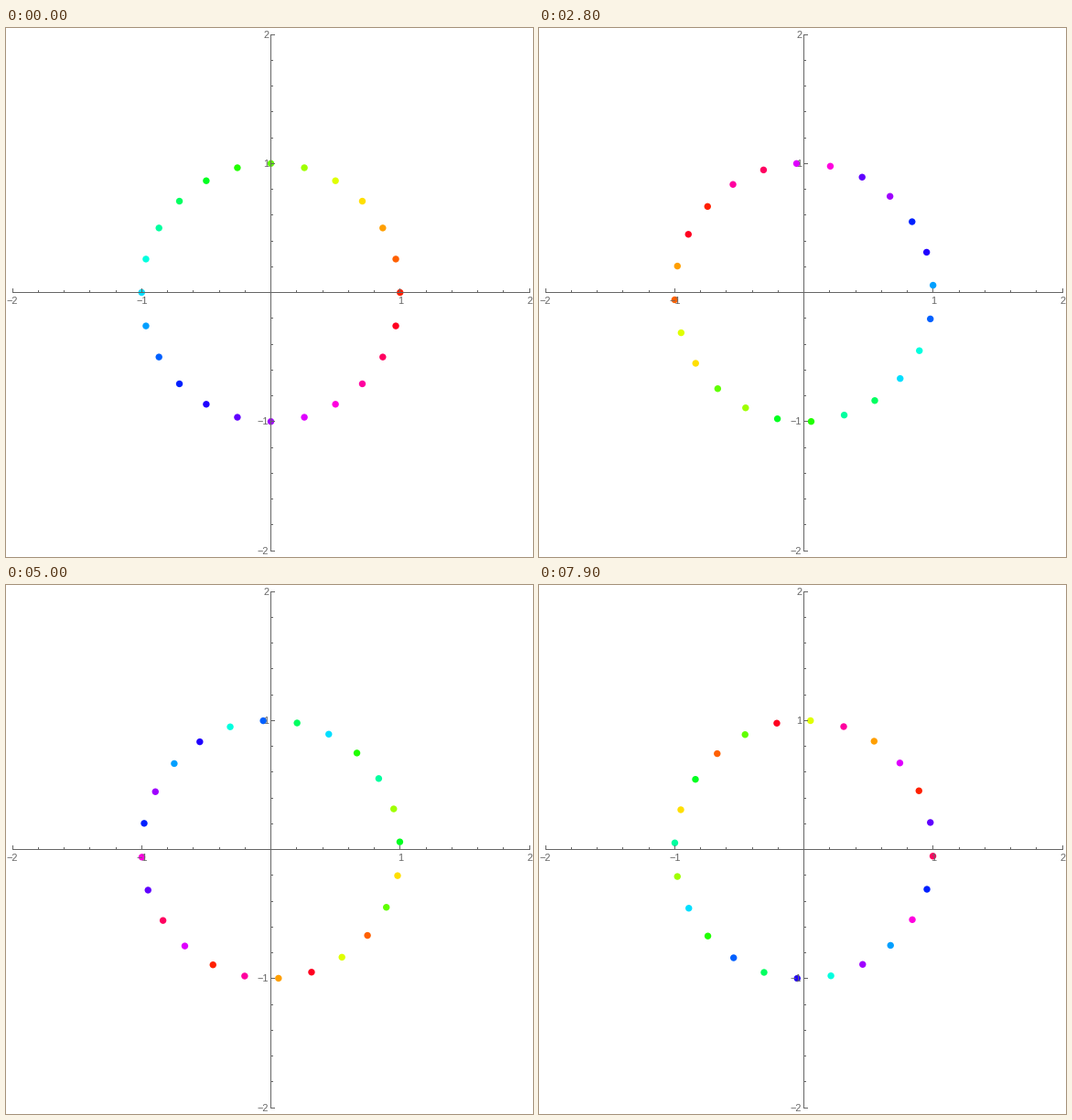
A matplotlib script that plays this animation: 576 by 579 pixels, repeating every 8000 ms.

```python
"""Ring of 24 point vortices whose odd and even halves keep overtaking each other."""
import colorsys

import matplotlib.pyplot as plt
import numpy as np
from matplotlib.animation import FuncAnimation
from matplotlib.patches import Rectangle

W, H, DPI = 576, 579, 100
CX, CY, UNIT = 289.5, 289.5, 141.3
FRAMES, STEP_MS, SUB = 80, 100, 20
N = 24
K = 0.08363       # vortex strength / 2 pi
E0 = 0.00093      # initial split of the squared radii
DRAG = 0.65       # slowing of the mean rotation while the halves pass
GRAY = "#666666"


def rates(s):
    """Change of (e, lead, mean): radii^2 are 1 +- e, lead is odd minus even."""
    e, lead, _ = s
    a, b = (1 + e) ** 6, (1 - e) ** 6
    psi = 12 * lead
    d = a * a + b * b + 2 * a * b * np.cos(psi)
    d_e = 24 * K * a * b * np.sin(psi) / d
    d_lead = K * (12 * (a * a - b * b) / d - 23 * e) / (1 - e * e)
    d_mean = K * (N - 1) / 2 - DRAG * e / 2 * d_lead
    return np.array([d_e, d_lead, d_mean])


def solve():
    h = STEP_MS / 1000 / SUB
    s = np.array([E0, 0.0, 0.0])
    states = [s]
    for _ in range(FRAMES - 1):
        for _ in range(SUB):
            k1 = rates(s)
            k2 = rates(s + h / 2 * k1)
            k3 = rates(s + h / 2 * k2)
            k4 = rates(s + h * k3)
            s = s + h / 6 * (k1 + 2 * k2 + 2 * k3 + k4)
        states.append(s)
    return states


states = solve()
index = np.arange(N)
side = np.where(index % 2, 1, -1)


def positions(i):
    e, lead, mean = states[i]
    ang = 2 * np.pi * index / N + mean + side * lead / 2
    r = UNIT * np.sqrt(1 + side * e)
    return np.column_stack([CX + r * np.cos(ang), CY - r * np.sin(ang)])


fig = plt.figure(figsize=(W / DPI, H / DPI), dpi=DPI, facecolor="white")
ax = fig.add_axes([0, 0, 1, 1])
ax.set_xlim(0, W)
ax.set_ylim(H, 0)
ax.axis("off")


def bar(x, y, w, h):
    ax.add_patch(Rectangle((x, y), w, h, fc=GRAY, ec="none", lw=0,
                           antialiased=False, zorder=3))


def label(x, y, value, ha):
    ax.text(x, y, str(value).replace("-", "\u2212"), ha=ha, va="baseline",
            family="Liberation Sans", size=11 * 72 / DPI, color=GRAY, zorder=4)


bar(7, 289, 566, 1)
bar(289, 7, 1, 566)
for n in range(-10, 11):
    if n == 0:
        continue
    offset = 141.25 * n / 5
    x, y = int(CX + offset), int(CY - offset)
    size = 4 if n % 5 == 0 else 2
    bar(x, 289 - size, 1, size)
    bar(290, y, size, 1)
    if n % 5 == 0:
        label(CX + offset, 302, n // 5, "center")
        label(287, y + 4, n // 5, "right")

colors = [colorsys.hsv_to_rgb((k + 0.5) / N, 1, 1) for k in range(N)]
dots = ax.scatter(*positions(0).T, s=(7.4 * 72 / DPI) ** 2, c=colors,
                  linewidths=0, zorder=2)


def draw(i):
    dots.set_offsets(positions(i))
    return [dots]


anim = FuncAnimation(fig, draw, frames=FRAMES, interval=STEP_MS,
                     repeat=True, repeat_delay=0)
plt.show()
```
